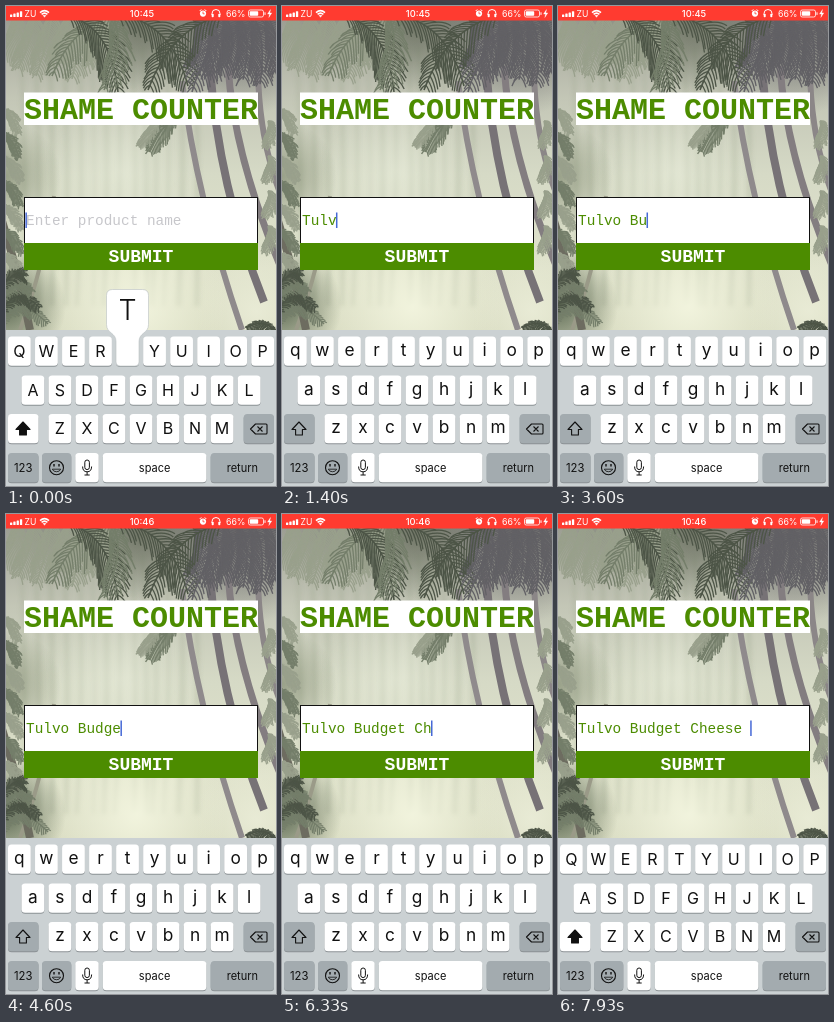
Animation, 270 px wide and 480 px high, one loop 8000 ms. Source, as an HTML page with a canvas:

```html
<!DOCTYPE html>
<html lang="en">
<head>
<meta charset="utf-8">
<style>
html, body { margin: 0; width: 100%; height: 100%; overflow: hidden; }
canvas, svg { position: absolute; left: 0; top: 0; width: 270px; height: 480px; }
text { font-family: Inter, Roboto, sans-serif; white-space: pre; }
.mono { font-family: "Liberation Mono", "Courier New", monospace; }
</style>
</head>
<body>
<canvas id="jungle" width="270" height="480"></canvas>
<svg id="ui" viewBox="0 0 270 480"></svg>
<script>
const LOOP = 8000;
const GREEN = '#4c8c00', RED = '#ff3b30', GREY = '#a3abaf', INK = '#111', BLUE = '#4669d6';
const CHAR = 8.64; // advance of the 14.4px input font

// [character, key down, key up]
const PRESSES = [
  ['T', -100, 70], ['u', 870, 930], ['l', 1070, 1200], ['v', 1270, 1370], ['o', 1930, 2000], [' ', 2530, 2670],
  ['B', 3200, 3330], ['u', 3470, 3540], ['d', 3700, 3800], ['g', 3870, 4000], ['e', 4130, 4270], ['t', 4870, 5000],
  [' ', 5270, 5400], ['C', 5870, 6070], ['h', 6200, 6330], ['e', 6470, 6600], ['e', 6730, 6870], ['s', 6930, 7000],
  ['e', 7130, 7260], [' ', 7400, 7530]
];
const SHIFTS = [200, 2870, 3400, 5600, 6130, 7730]; // case flips, starting in capitals
const HINT = [6870, 7070];
const CLOCK_TICK = 4070;

const ROWS = [['qwertyuiop', 13.4, 330.5], ['asdfghjkl', 26.9, 369.5], ['zxcvbnm', 53.9, 408]];
const KEYS = ROWS.flatMap(([row, x, y]) => [...row].map((c, i) => ({ c, x: x + i * 27.03, y })));

const rect = (x, y, w, h, fill, extra = '') =>
  `<rect x="${x}" y="${y}" width="${w}" height="${h}" fill="${fill}" ${extra}/>`;
const text = (s, x, y, size, fill = INK, extra = 'text-anchor="middle"') =>
  `<text x="${x}" y="${y}" font-size="${size}" fill="${fill}" ${extra}>${s}</text>`;
const path = (d, stroke, width = 1, fill = 'none') =>
  `<path d="${d}" stroke="${stroke}" stroke-width="${width}" fill="${fill}" stroke-linejoin="round"/>`;
const mono = (s, x, y, size, fill, bold) =>
  text(s, x, y, size, fill, `class="mono" ${bold ? 'font-weight="700"' : ''}`);
const key = (x, y, w, fill = '#fff') =>
  rect(x, y + 1, w, 29.3, '#8b9194', 'rx="3.6"') + rect(x, y, w, 29.3, fill, 'rx="3.6"');

function statusBar(t) {
  let s = rect(0, 0, 270, 14.5, RED);
  for (let i = 0; i < 4; i++) s += rect(4 + i * 3.3, 8.6 - i * 1.1, 2.3, 2.4 + i * 1.1, '#fff', 'rx=".5"');
  s += text('ZU', 18.5, 11, 8.6, '#fff', '');
  s += path('M34 6.6Q38.5 2.6 43 6.6M35.6 8.4Q38.5 5.8 41.4 8.4', '#fff', 1.5) + path('M37 9.3h3l-1.5 2z', '#fff', .4, '#fff');
  s += text(t < CLOCK_TICK ? '10:45' : '10:46', 136, 11, 9.3, '#fff', 'text-anchor="middle" font-weight="500"');
  s += '<circle cx="197" cy="7.6" r="3.1" fill="#fff"/>' + path('M197 5.6v2.2h1.6', RED, .8) + path('M193.7 5l1.6-1.6M200.3 5l-1.6-1.6', '#fff');
  s += path('M206 9V7.5a4 4 0 0 1 8 0V9', '#fff') + rect(205.7, 7.7, 2, 3.6, '#fff', 'rx=".8"') + rect(212.3, 7.7, 2, 3.6, '#fff', 'rx=".8"');
  s += text('66%', 239.5, 11, 8.8, '#fff', 'text-anchor="end"');
  s += rect(242.5, 4, 15, 7, 'none', 'rx="1.8" stroke="#fff" stroke-width=".8"') + rect(243.7, 5.2, 8.5, 4.6, '#fff', 'rx=".8"');
  return s + rect(258.5, 6.3, 1, 2.6, '#fff') + path('M264.5 3.5l-3 4.6h2l-.7 3.4 3-4.6h-2z', '#fff', .3, '#fff');
}

function form(t) {
  const done = PRESSES.filter(p => p[2] <= t);
  const typed = done.map(p => p[0]).join('');
  const hint = t >= HINT[0] && t < HINT[1];
  const end = 20 + typed.length * CHAR;
  let s = rect(18, 86.5, 234, 32.5, '#fff') + mono('SHAME COUNTER', 18, 112.5, 30, GREEN, true);
  s += rect(18.5, 191.5, 233, 46, '#fff', 'stroke="#111"') + rect(18, 237, 234, 27, GREEN);
  if (hint) s += rect(20 + 13 * CHAR - 2, 206, end - 18 - 13 * CHAR, 16.5, '#cfd4d6');
  s += typed ? mono(typed, 20, 218.5, 14.4, GREEN) : mono('Enter product name', 20, 218.5, 14.4, '#c7c7cb');
  s += mono('SUBMIT', 102.6, 256, 18, '#fff', true);
  if (hint) {
    s += path('M129.5 222.5H176Q182 222.5 182 231T176 240H129.5Z', '#d5d8dc', .7, '#fff');
    s += mono('Chef', 132, 236, 14.4, '#3157c8') + path('M169.8 228.8l5 5M174.8 228.8l-5 5', '#b4b7bb');
  }
  // the caret rests solid after each letter, then fades off and on
  const p = (t - (done.length ? done.at(-1)[2] : 0)) % 1000;
  const alpha = p < 470 ? 1 : p < 620 ? (620 - p) / 150 : p < 850 ? 0 : (p - 850) / 150;
  return s + rect(end - .6, 206.5, 1.5, 15.5, BLUE, `opacity="${alpha.toFixed(2)}"`);
}

function popup({ x, y }, label) {
  const d = `M${x - 15} ${y - 47}h30q6 0 6 6v29c0 9 -9.5 8 -9.5 17v20.5q0 4 -4 4h-15q-4 0 -4 -4v-20.5c0 -9 -9.5 -8 -9.5 -17v-29q0 -6 6 -6z`;
  return path(d, '#b9bfc1', .6, '#fff') + text(label, x, y - 16.5, 28.5, INK, 'text-anchor="middle" font-weight="300"');
}

function keyboard(t) {
  const upper = SHIFTS.filter(x => x <= t).length % 2 === 0;
  const down = PRESSES.find(p => p[1] <= t && t < p[2])?.[0];
  const show = c => upper ? c.toUpperCase() : c;
  let s = rect(0, 324, 270, 156, '#cbd1d3');
  for (const k of KEYS) s += key(k.x - 11.4, k.y, 22.8) + text(show(k.c), k.x, k.y + (upper ? 20.4 : 19.3), upper ? 16 : 17.3);
  s += key(2, 408, 30.5, upper ? '#fff' : GREY) + path('M17 416l7 7.5h-3.6v5.5h-6.8v-5.5H10z', INK, 1.1, upper ? INK : 'none');
  s += key(237.7, 408, 30.3, GREY) + path('M249.5 418h10.5q1 0 1 1v8q0 1 -1 1h-10.5l-5-5zM251.5 420.5l5 5M256.5 420.5l-5 5', INK, 1.1);
  s += key(2, 447, 30.5, GREY) + text('123', 17.2, 465.6, 11.3);
  s += key(36, 447, 29.3, GREY) + '<circle cx="50.5" cy="461.7" r="7" fill="none" stroke="#111" stroke-width="1.1"/>';
  s += path('M46.3 463.2a4.4 3.6 0 0 0 8.4 0z', INK, .8) + path('M48 458v2.4M53 458v2.4', INK, 1.4);
  s += key(69.3, 447, 23.4) + rect(78.8, 454, 4.6, 9.6, 'none', 'rx="2.3" stroke="#111"');
  s += path('M76.6 460.5q0 5.3 4.5 5.3t4.5 -5.3M81.1 465.8v3.2M78.5 469h5.2', INK);
  s += key(96.8, 447, 103.6, down === ' ' ? GREY : '#fff') + text('space', 148.6, 465.6, 11);
  s += key(204.7, 447, 63.3, GREY) + text('return', 236.4, 465.6, 11);
  const k = down && KEYS.find(k => k.c === down.toLowerCase());
  return k ? s + popup(k, show(k.c)) : s;
}

function paintJungle() {
  const g = document.getElementById('jungle').getContext('2d');
  let seed = 7;
  const rnd = () => (seed = seed * 16807 % 2147483647) / 2147483647;

  const sky = g.createLinearGradient(0, 14, 0, 324);
  [['#a3a499', 0], ['#c3c6b6', .25], ['#d6dac6', .5], ['#dfe2cb', .8], ['#d9dcc2', 1]].forEach(([c, p]) => sky.addColorStop(p, c));
  g.fillStyle = sky;
  g.fillRect(0, 0, 270, 324);

  const glow = (x, y, r, rgb, a) => {
    const f = g.createRadialGradient(x, y, 0, x, y, r);
    f.addColorStop(0, `rgba(${rgb},${a})`);
    f.addColorStop(1, `rgba(${rgb},0)`);
    g.fillStyle = f;
    g.fillRect(0, 0, 270, 324);
  };
  const curve = (x0, y0, cx, cy, x1, y1, w, color) => {
    g.strokeStyle = color;
    g.lineWidth = w;
    g.beginPath();
    g.moveTo(x0, y0);
    g.quadraticCurveTo(cx, cy, x1, y1);
    g.stroke();
  };

  // distant trees in the mist
  g.filter = 'blur(2px)';
  for (let i = 0; i < 14; i++) {
    const x = 15 + i * 13 + rnd() * 8;
    curve(x, 40, x + 5, 170, x + rnd() * 10 - 5, 300, 2 + rnd() * 4, 'rgba(150,160,138,.28)');
  }
  g.filter = 'none';
  glow(115, 165, 85, '236,240,222', .55);
  glow(130, 300, 90, '244,246,224', .9);
  glow(250, 305, 60, '238,240,220', .7);
  glow(235, 15, 95, '96,95,98', .85);
  glow(135, 20, 65, '84,92,74', .65);
  glow(45, 15, 60, '128,132,120', .6);
  glow(0, 170, 55, '112,122,96', .6);
  glow(0, 300, 60, '74,88,66', .85);

  g.filter = 'blur(.6px)';
  curve(176, 75, 190, 190, 236, 324, 6, '#8f8a8c');
  curve(204, 60, 212, 180, 258, 296, 8, '#777276');
  curve(222, 60, 228, 150, 275, 262, 7, '#837d80');
  curve(252, 60, 252, 130, 275, 190, 6, '#8b8687');
  curve(48, 190, 38, 260, 14, 324, 4, '#9a9a88');
  curve(-4, 215, 12, 265, 24, 324, 8, '#6d6c60');

  // a bent stem whose thin, uneven leaflets sag downwards
  const frond = (x0, y0, cx, cy, x1, y1, len, color) => {
    curve(x0, y0, cx, cy, x1, y1, 1.6, color);
    for (let s = 0; s <= 1; s += .04) {
      const u = 1 - s;
      const x = u * u * x0 + 2 * u * s * cx + s * s * x1, y = u * u * y0 + 2 * u * s * cy + s * s * y1;
      const a = Math.atan2(u * (cy - y0) + s * (y1 - cy), u * (cx - x0) + s * (x1 - cx));
      for (const side of [-.9, .7]) {
        const l = len * (.6 + .5 * rnd()) * Math.sin(Math.PI * (.2 + .7 * s));
        const dx = l * Math.cos(a + side), dy = l * Math.sin(a + side);
        curve(x, y, x + dx * .7, y + dy * .5, x + dx, y + dy + l * .4, 1.3, color);
      }
    }
  };
  const dark = '#4d5547', mid = '#747e6a', pale = '#99a08c', dusk = '#626165';
  for (let i = 0; i < 6; i++) frond(10 + i * 18, 8, 12 + i * 16, 30, i * 18 - 6, 48 + rnd() * 25, 20, pale);
  for (let i = 0; i < 6; i++) frond(190 + i * 14, 8, 205 + i * 14, 30, 186 + i * 17, 52 + rnd() * 36, 24, dusk);
  frond(125, 8, 70, 10, 46, 70, 24, mid);
  frond(62, 10, 105, 20, 112, 86, 26, dark);
  frond(105, 8, 122, 35, 98, 84, 22, mid);
  frond(110, 8, 165, 15, 182, 80, 28, dark);
  frond(215, 10, 165, 22, 142, 84, 26, dark);
  frond(260, 22, 205, 18, 186, 86, 24, dusk);
  frond(172, 112, 155, 118, 143, 146, 13, mid);
  frond(152, 112, 145, 125, 132, 140, 9, pale);
  for (let i = 0; i < 7; i++) frond(-6, 105 + i * 24, 6, 104 + i * 24, 12 + rnd() * 6, 128 + i * 24, 10, i % 2 ? mid : pale);
  for (let i = 0; i < 4; i++) frond(262, 115 + i * 35, 268, 120 + i * 35, 258, 142 + i * 35, 10, pale);
  for (let i = 0; i < 4; i++) frond(-5, 318 - i * 12, 10, 285 - i * 8, 42 - i * 8, 318 - i * 16, 13, i % 2 ? dark : mid);
  frond(272, 330, 262, 310, 240, 322, 9, dark);
}

const ui = document.getElementById('ui');
let shown = '', start;
function tick(now) {
  start ??= now;
  const t = (now - start) % LOOP;
  const view = statusBar(t) + form(t) + keyboard(t);
  if (view !== shown) ui.innerHTML = shown = view;
  requestAnimationFrame(tick);
}
paintJungle();
tick(performance.now());
</script>
</body>
</html>
```
